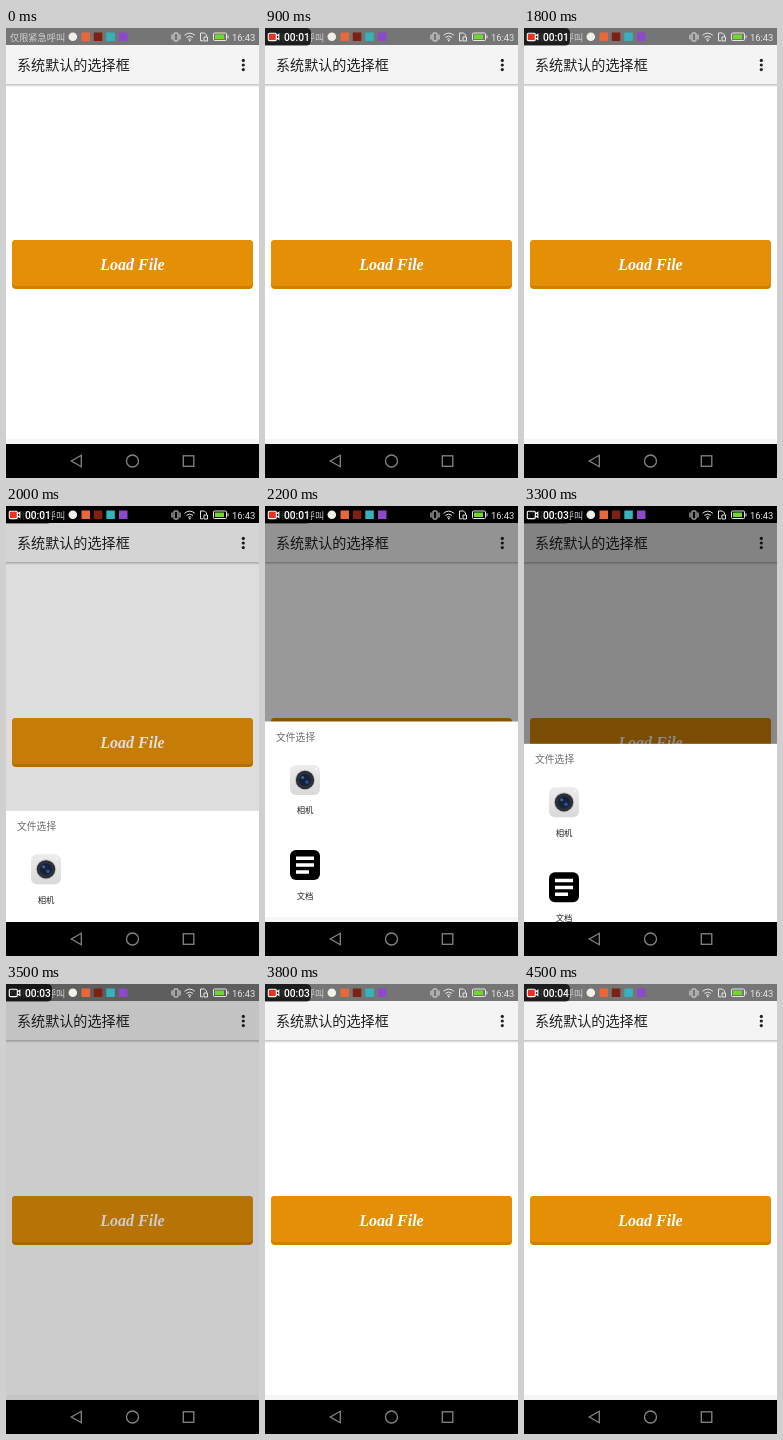
An HTML page for the animation above (5 s loop, 253 by 450 pixels).

```html
<!DOCTYPE html>
<html lang="zh-CN">
<head>
<meta charset="utf-8">
<title>文件选择</title>
<style>
  html, body { margin: 0; width: 100%; height: 100%; overflow: hidden; background: #fff; }
  svg { display: block; width: 100%; height: 100%; }
  text { font-family: "Noto Sans CJK SC", "Noto Sans CJK", "Noto Sans", sans-serif; }
  .latin { font-family: Roboto, sans-serif; }
  .script { font: italic bold 16px "Liberation Serif", serif; }
  .line { fill: none; stroke-width: 1.3; }
</style>
</head>
<body>
<svg viewBox="0 0 253 450">
  <defs>
    <linearGradient id="shade" x2="0" y2="1">
      <stop offset="0" stop-color="#bdbdbd"/><stop offset="1" stop-color="#fff"/>
    </linearGradient>
    <linearGradient id="body" x2="0" y2="1">
      <stop offset="0" stop-color="#ececec"/><stop offset="1" stop-color="#d9d9d9"/>
    </linearGradient>
    <radialGradient id="lens">
      <stop offset="0" stop-color="#18253d"/><stop offset=".55" stop-color="#142139"/>
      <stop offset=".75" stop-color="#30343a"/><stop offset="1" stop-color="#25282d"/>
    </radialGradient>
    <radialGradient id="glow">
      <stop offset="0" stop-color="#fff" stop-opacity=".62"/>
      <stop offset=".65" stop-color="#fff" stop-opacity=".8"/>
      <stop offset=".78" stop-color="#fff" stop-opacity=".45"/>
      <stop offset="1" stop-color="#fff" stop-opacity="0"/>
    </radialGradient>
    <clipPath id="screen"><rect width="253" height="416"/></clipPath>
  </defs>

  <!-- app page -->
  <rect width="253" height="416" fill="#fff"/>
  <rect y="411" width="253" height="5" fill="#f6f6f6"/>
  <rect y="56" width="253" height="3" fill="url(#shade)"/>
  <rect y="17" width="253" height="39" fill="#f4f4f4"/>
  <text x="11" y="42.3" font-size="14.1" fill="#202020">系统默认的选择框</text>
  <g fill="#222">
    <circle cx="237.3" cy="32.4" r="1.6"/><circle cx="237.3" cy="37" r="1.6"/><circle cx="237.3" cy="41.6" r="1.6"/>
  </g>
  <rect id="base" x="6" y="212" width="241" height="49" rx="4" fill="#d08000"/>
  <rect id="face" x="6" y="212" width="241" height="46" rx="4" fill="#e58f07"/>
  <text id="caption" class="script" x="126.5" y="242" text-anchor="middle" fill="#fff">Load File</text>
  <rect id="statusBack" width="253" height="17" fill="#757575"/>
  <rect id="dim" width="253" height="416"/>

  <!-- chooser sheet -->
  <g clip-path="url(#screen)">
    <g id="sheet">
      <rect y="215.5" width="253" height="201" fill="#fff"/>
      <rect y="411" width="253" height="5" fill="#f6f6f6"/>
      <text x="11" y="234.7" font-size="9.8" fill="#6c6c6c">文件选择</text>
      <rect x="25" y="259" width="30" height="30" rx="6" fill="url(#body)"/>
      <circle cx="40" cy="274" r="10.2" fill="#c9c9c9"/>
      <circle cx="40" cy="274" r="9.2" fill="url(#lens)"/>
      <circle cx="37.7" cy="271.5" r="1.5" fill="#3c68a8"/>
      <circle cx="42" cy="276" r="1.8" fill="#28559b"/>
      <circle cx="51" cy="263" r=".9" fill="#fff"/>
      <rect x="25" y="344" width="30" height="30" rx="6"/>
      <path d="M31 350.5h18v3.5h-18zM31 357.3h18v3.5h-18zM31 364.2h13v3.5h-13z" fill="#fff"/>
      <g font-size="8.4" fill="#222" text-anchor="middle">
        <text x="40" y="307.2">相机</text><text x="40" y="392.7">文档</text>
      </g>
    </g>
  </g>

  <!-- status bar -->
  <text x="4" y="12.6" font-size="9.2" fill="#d2d2d2">仅限紧急呼叫</text>
  <circle cx="66.8" cy="8.7" r="4.3" fill="#f2efe9"/>
  <rect x="75.5" y="4.5" width="8.5" height="8.5" fill="#e8683c"/>
  <rect x="87.8" y="4.5" width="8.5" height="8.5" fill="#7d2114"/>
  <rect x="100.3" y="4.5" width="8.5" height="8.5" fill="#35b3bd"/>
  <rect x="113" y="4.5" width="8.5" height="8.5" fill="#8c49cc"/>
  <g class="line" stroke="#e6e6e6" style="stroke-width:1">
    <rect x="168" y="5" width="4" height="8" rx=".6"/>
    <path d="M166 6.5v5M174 6.5v5"/>
    <path d="M178.5 7.3q5.2-4.4 10.4 0M180.4 9.4q3.3-2.7 6.6 0M182.1 11.3q1.6-1.2 3.2 0"/>
    <path d="M197 12.8h-2.5v-7.8h4l2 2v1.5M198 9h3.5v4h-3.5z"/>
    <rect x="207.5" y="5" width="13" height="7.5" rx="1"/>
    <path d="M222 7.3v3"/>
  </g>
  <circle cx="183.7" cy="12.6" r=".9" fill="#e6e6e6"/>
  <rect x="209" y="6.5" width="9" height="4.5" fill="#72d62c"/>
  <text class="latin" x="226" y="12.6" font-size="9.4" fill="#e6e6e6">16:43</text>

  <!-- recorder badge -->
  <g id="badge">
    <path d="M0 0H41Q46 0 46 5V12Q46 17.5 41 17.5H0Z" opacity=".76"/>
    <rect id="lamp" x="4" y="6" width="7" height="6" fill="#f0301c"/>
    <path class="line" stroke="#fff" style="stroke-width:1.1" d="M4.3 5.3h6q1 0 1 1v5.3q0 1-1 1h-6q-1 0-1-1v-5.3q0-1 1-1zM11.3 8l2.5-1.7v5.2l-2.5-1.7"/>
    <text id="clock" class="latin" x="19" y="12.8" font-size="10.2" font-weight="500" fill="#fff"></text>
  </g>

  <circle id="touch" r="9.5" fill="url(#glow)"/>

  <!-- navigation bar -->
  <rect y="416" width="253" height="34"/>
  <g class="line" stroke="#858585">
    <path d="M75.3 427.3v11.4l-10-5.7z"/>
    <circle cx="126.5" cy="433" r="6"/>
    <rect x="177.3" y="427.8" width="10.5" height="10.5"/>
  </g>
</svg>
<script>
const LOOP = 5000, STEP = 100;
const OPEN = 1900, CLOSE = 3200, SLIDE = 300, FADE = 450;
const TICKS = [900, 2400, 3000, 4000];
const LAMP_ON = [[400, 1000], [1500, 2400], [2500, 3000], [3600, 4000], [4500, LOOP]];

const $ = id => document.getElementById(id);
const clamp = v => Math.min(1, Math.max(0, v));
const within = (t, from, to) => t >= from && t < to;
const show = (id, visible) => $(id).setAttribute("visibility", visible ? "visible" : "hidden");
const set = (id, name, value) => $(id).setAttribute(name, value);

function draw(t) {
  show("badge", t >= 100);
  $("clock").textContent = "00:0" + TICKS.filter(tick => t >= tick).length;
  set("lamp", "opacity", LAMP_ON.some(([a, b]) => within(t, a, b)) && t >= 100 ? 1 : 0);

  const pressed = within(t, 1200, 1600);
  show("base", !pressed);
  set("face", "y", pressed ? 215 : 212);
  set("caption", "y", pressed ? 245 : 242);

  const tapButton = within(t, 1200, 1700), tapOutside = within(t, 3000, 3200);
  show("touch", tapButton || tapOutside);
  set("touch", "transform", tapButton ? "translate(174 239)" : "translate(175.7 153)");
  set("touch", "opacity", within(t, 1600, 1700) ? .5 : 1);

  const entering = 1 - (1 - clamp((t - OPEN) / SLIDE)) ** 2;
  const leaving = clamp((t - CLOSE) / SLIDE) ** 2;
  set("sheet", "transform", `translate(0 ${201 * (1 - entering + leaving)})`);
  set("dim", "opacity", .6 * (clamp((t - OPEN) / FADE) - clamp((t - CLOSE) / FADE)));
  set("statusBack", "fill", within(t, 2000, 3500) ? "#000" : "#757575");
}

const start = performance.now();
function frame() {
  const t = (performance.now() - start) % LOOP;
  draw(Math.floor(t / STEP) * STEP);
  requestAnimationFrame(frame);
}
frame();
</script>
</body>
</html>
```
